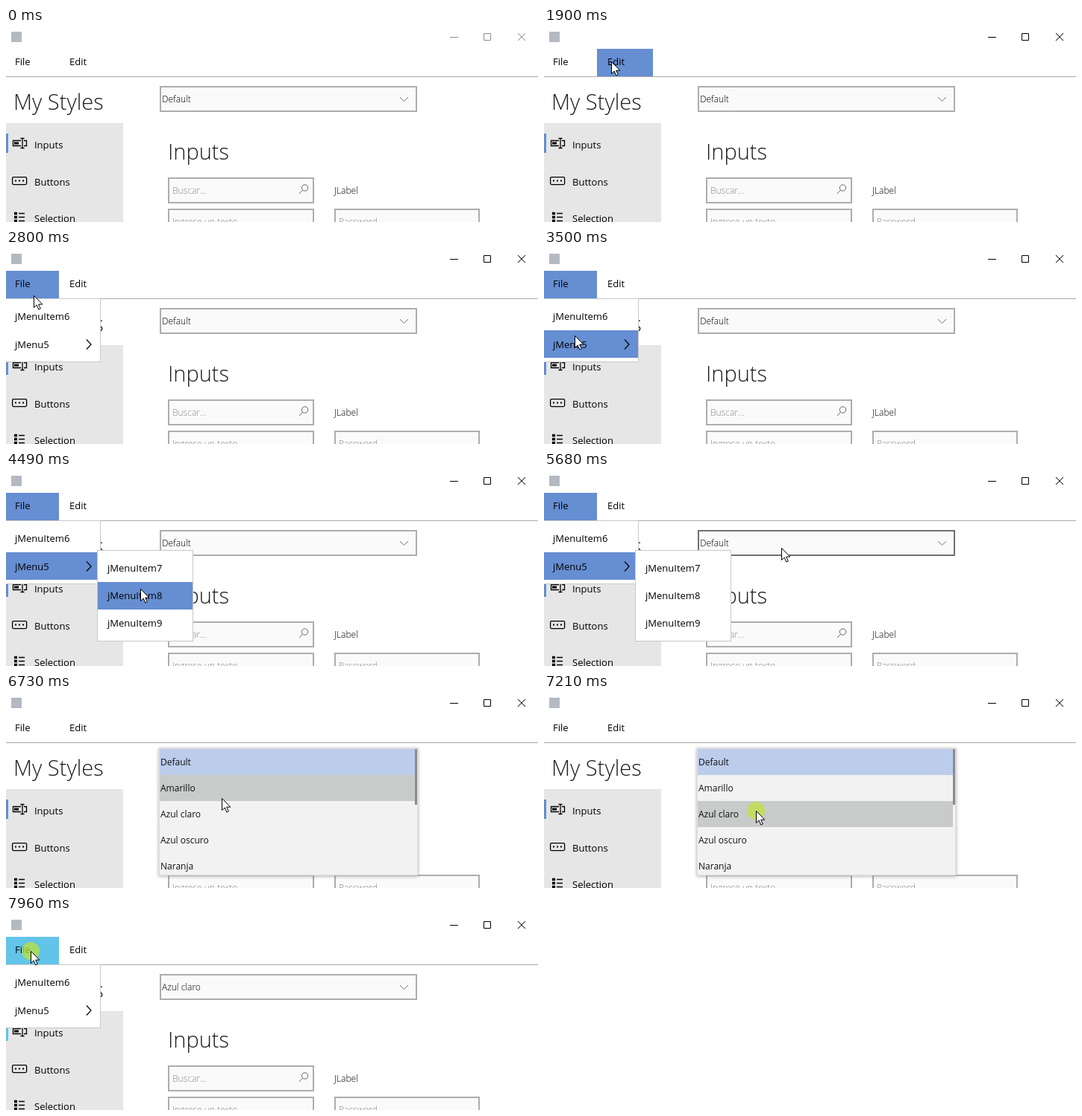
These frames come from a looping animation (713 px wide and 261 px high, 8000 ms). An HTML page:

```html
<!DOCTYPE html>
<html lang="en">
<head>
<meta charset="utf-8">
<title>My Styles</title>
<style>
  html, body { margin: 0; width: 100%; height: 100%; overflow: hidden; background: #fff; }
  svg { display: block; width: 713px; height: 261px; font: 13px "Open Sans", "Noto Sans", sans-serif; }
  .light { font-weight: 300; font-size: 12px; }
  .title { font-weight: 300; font-size: 29px; fill: #1c1c1c; }
  .hint { fill: #888; }
  .small { font-size: 12px; fill: #111; }
  .field { fill: #fafafa; stroke: #adadad; stroke-width: 2; }
  .line { fill: none; stroke: #000; }
  .popup { fill: #fff; stroke: #c8c8c8; }
</style>
</head>
<body>
<svg viewBox="0 0 713 261">
  <defs>
    <filter id="shadow" x="-5%" y="-5%" width="110%" height="110%">
      <feDropShadow dx="0" dy="1" stdDeviation="2" flood-opacity=".3"/>
    </filter>
  </defs>
  <rect width="713" height="261" fill="#fff"/>
  <rect x="7" y="5" width="14" height="14" fill="#b4bac2"/>
  <path id="controls" class="line" d="M595 12.5h11M640.5 7.5h9v9h-9zM686 7l10 10M696 7l-10 10"/>

  <rect id="fileBg" y="28" width="71" height="37"/>
  <rect id="editBg" x="71" y="28" width="75" height="37"/>
  <text x="12" y="50">File</text>
  <text x="85" y="50">Edit</text>
  <path d="M0 65.5H713" stroke="#a9a9a9"/>

  <text class="title" x="10" y="110">My Styles</text>
  <rect y="128" width="157" height="133" fill="#e6e6e6"/>
  <rect id="marker" y="142" width="3" height="26"/>
  <text x="38" y="162">Inputs</text>
  <text x="38" y="212">Buttons</text>
  <text x="38" y="261">Selection</text>
  <g class="line">
    <path d="M20 151.5H9.5v7H20M24 151.5h3.500v7H24M19.500 148.500h5M19.500 161.500h5M22 148.500v13" stroke-width="1.300"/>
    <path d="M11 155h6" stroke-width="3"/>
    <rect x="8.600" y="200.600" width="19" height="10" rx="1.500" stroke-width="1.300"/>
    <path d="M12 205.500h2m3 0h2m3 0h2" stroke-width="2"/>
    <path d="M11 249.500h4m-4 5h4m-4 5h4" stroke-width="3.500"/>
    <path d="M17 249.500h8m-8 5h8m-8 5h8" stroke-width="1.500"/>
  </g>

  <rect id="combo" class="field" x="207" y="79" width="343" height="33"/>
  <text id="choice" class="light" x="209" y="100"></text>
  <path class="line" d="M528 93l5.500 5.500L539 93" style="stroke:#777"/>

  <text class="title" x="217" y="177">Inputs</text>
  <rect class="field" x="218" y="202" width="194" height="33"/>
  <rect class="field" x="218" y="244" width="194" height="33"/>
  <rect class="field" x="441" y="244" width="193" height="33"/>
  <g class="light">
    <text class="hint" x="223" y="223">Buscar...</text>
    <text class="hint" x="223" y="265">Ingrese un texto</text>
    <text class="hint" x="446" y="265">Password</text>
    <text x="440" y="223">JLabel</text>
  </g>
  <g class="line" style="stroke:#666"><circle cx="400.500" cy="215" r="4.200"/><path d="M397.500 218.200l-4.500 4.800"/></g>

  <g id="fileMenu">
    <rect class="popup" x="-.5" y="65.500" width="127" height="85"/>
    <rect id="fileHover" width="126" height="37"/>
    <text x="12" y="94">jMenuItem6</text>
    <text x="12" y="132">jMenu5</text>
    <path class="line" d="M108 120.500l6 6.500-6 6.500" stroke-width="1.200"/>
  </g>
  <g id="subMenu">
    <rect class="popup" x="122.500" y="105.500" width="128" height="122"/>
    <rect id="subHover" x="123" width="127" height="37"/>
    <text x="136" y="134">jMenuItem7</text>
    <text x="136" y="171">jMenuItem8</text>
    <text x="136" y="208">jMenuItem9</text>
  </g>
  <g id="list">
    <rect x="205" y="73" width="347" height="171" fill="#f2f2f2" stroke="#ccc" filter="url(#shadow)"/>
    <rect x="206" y="74" width="342" height="35" fill="#bccdec"/>
    <rect id="listHover" x="206" width="342" height="35" fill="#c9caca"/>
    <rect x="548" y="74" width="3" height="75" fill="#8b8b8b"/>
  </g>

  <circle id="click" r="12" fill="#bee13c" fill-opacity=".75"/>
  <path id="pointer" d="M.5.500V16.500L4.200 13 6.800 19 9.300 17.900 6.700 12.100H11.800Z" fill="#fff" stroke="#000"/>
</svg>
<script>
const LOOP = 8000, STEP = 70;
const el = Object.fromEntries([...document.querySelectorAll("[id]")].map(e => [e.id, e]));

["Default", "Amarillo", "Azul claro", "Azul oscuro", "Naranja"].forEach((name, i) => {
  const row = document.createElementNS("http://www.w3.org/2000/svg", "text");
  row.setAttribute("class", "small");
  row.setAttribute("x", 207);
  row.setAttribute("y", 96 + 35 * i);
  row.textContent = name;
  el.list.append(row);
});

// Pointer stops: time, x, y
const stops = [
  [460, 556, 241], [670, 260, 122], [880, 47, 37], [1080, 47, 37],
  [1360, 85, 45], [1570, 93, 45], [1830, 93, 45], [1900, 90, 45],
  [2240, 35, 45], [2320, 35, 45], [2390, 36, 45], [2590, 36, 45],
  [3430, 40, 107], [3500, 41, 115], [3710, 43, 117], [3790, 43, 117],
  [4140, 130, 127], [4490, 180, 157], [4630, 182, 172], [4910, 186, 198],
  [5250, 230, 142], [5470, 286, 122], [5540, 296, 114], [5680, 318, 102],
  [6030, 306, 110], [6300, 306, 110], [6730, 289, 140], [7140, 284, 157],
  [7280, 284, 157], [7490, 130, 90], [7700, 33, 47], [LOOP, 33, 47]
];

function pointerAt(t) {
  const i = stops.findIndex(s => s[0] > t);
  const [t0, x0, y0] = stops[i - 1], [t1, x1, y1] = stops[i];
  const u = Math.floor((t - t0) / STEP) * STEP / (t1 - t0);
  return [Math.round(x0 + (x1 - x0) * u), Math.round(y0 + (y1 - y0) * u)];
}

const within = (v, a, b) => v >= a && v < b;
const show = (e, on) => e.style.display = on ? "" : "none";

// Highlights the row under y; hides the highlight when y is outside all rows.
function hover(e, y, tops, height) {
  const top = tops.find(v => within(y, v, v + height));
  show(e, top !== undefined);
  if (top !== undefined) e.setAttribute("y", top);
}

function render(t) {
  const visible = t >= 460;
  const [x, y] = visible ? pointerAt(t) : [-50, -50];
  const chosen = t >= 7280;
  const accent = chosen ? "#62c4e8" : "#668ed2";
  const fileOpen = within(t, 1900, 6100) && (t >= 2240 || x < 71) || t >= 7960;
  const subOpen = within(t, 3710, 6100);
  const listOpen = within(t, 6100, 7280);

  for (const key of ["fileBg", "editBg", "marker", "fileHover", "subHover"])
    el[key].setAttribute("fill", accent);
  el.controls.style.stroke = t >= 1360 ? "#000" : "#8f8f8f";
  show(el.editBg, within(t, 1360, 2240) && !fileOpen);
  show(el.fileBg, fileOpen);
  show(el.fileMenu, fileOpen);
  show(el.subMenu, subOpen);
  show(el.list, listOpen);

  hover(el.fileHover, subOpen ? 115 : y, [71, 108], 37);
  hover(el.subHover, within(x, 123, 251) ? y : -1, [111, 148, 185], 37);
  hover(el.listHover, t >= 6370 ? y : -1, [109, 144], 35);

  const overCombo = within(x, 206, 551) && within(y, 78, 113) && t > 1000;
  el.combo.style.stroke = overCombo ? "#707070" : "";
  el.choice.textContent = chosen ? "Azul claro" : "Default";

  show(el.pointer, visible);
  el.pointer.setAttribute("transform", `translate(${x} ${y})`);
  show(el.click, within(t, 1360, 1500) || within(t, 6030, 6170) || within(t, 7210, 7350) || t >= 7960);
  el.click.setAttribute("cx", x);
  el.click.setAttribute("cy", y);
}

const start = performance.now();
function tick() {
  render((performance.now() - start) % LOOP);
  requestAnimationFrame(tick);
}
tick();
</script>
</body>
</html>
```
